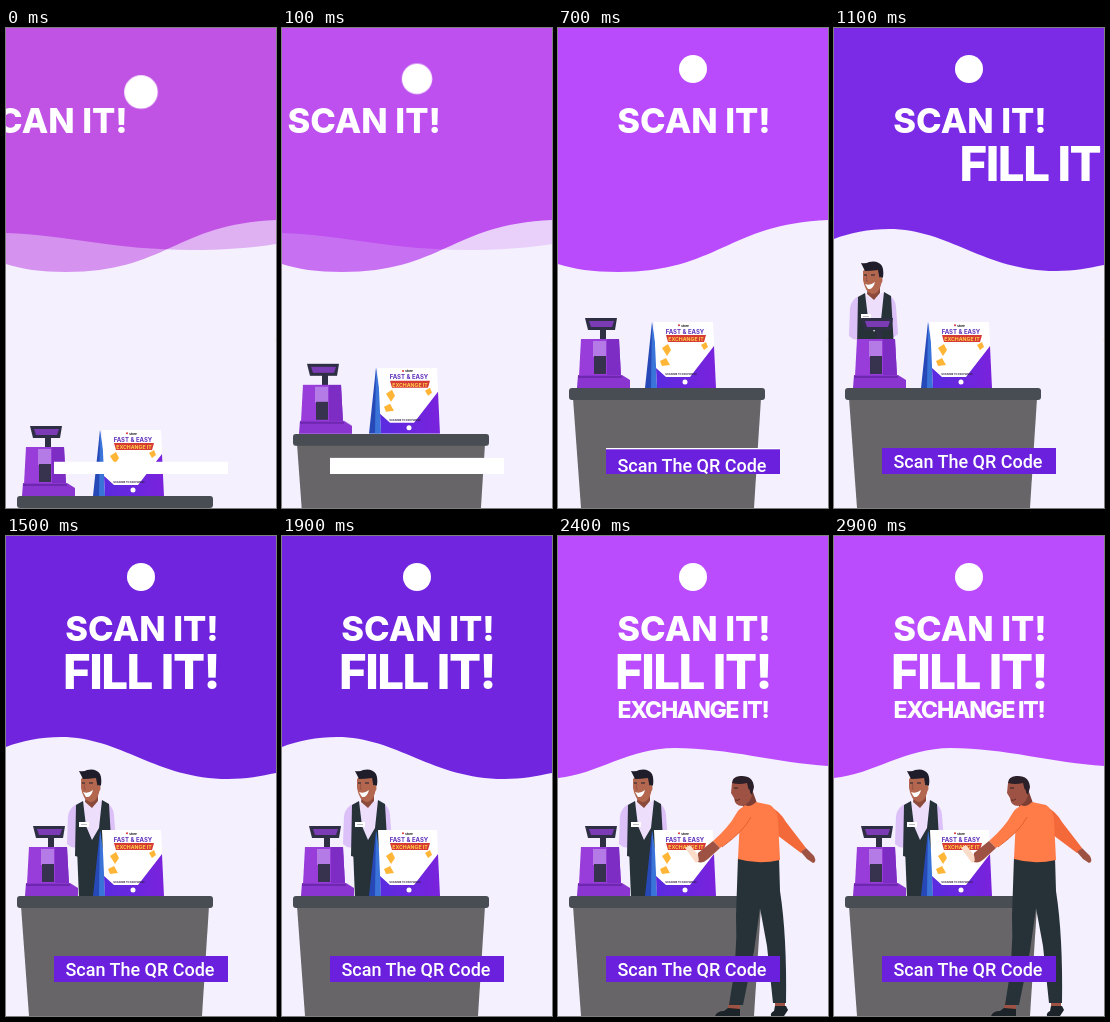
Animation of 270 by 480 pixels, one loop 3 s. Source, as an HTML page:

```html
<!DOCTYPE html>
<html lang="en">
<head>
<meta charset="utf-8">
<title>Scan it, fill it, exchange it</title>
<style>
  html, body { margin: 0; width: 100%; height: 100%; overflow: hidden; background: #f4f0fe; }
  svg { display: block; width: 100vw; height: 100vh; --out: cubic-bezier(.33,1,.68,1); }

  .move, .move * { animation: 3s linear infinite paused; }
  .head { font: 800 34.5px Inter, sans-serif; font-optical-sizing: none; fill: #fff; text-anchor: middle; }
  .label { font: 500 18px Roboto, sans-serif; fill: #fff; text-anchor: middle; }
  .tiny { font: 700 3px Inter, sans-serif; text-anchor: middle; }

  /* Adding the layers keeps the overlap solid while the waves dissolve. */
  #sky { animation-name: tint; fill: currentColor; isolation: isolate; }
  #sky use { mix-blend-mode: plus-lighter; }
  #swell { animation-name: swell; }
  #rising { animation-name: rising; }
  #falling { animation-name: falling; }
  #ebb { animation-name: ebb; }
  #hill { animation-name: hill; }
  #core { animation-name: core; }

  #logo { animation-name: logo; transform-origin: 135px 41px; }
  #scan { animation-name: scan; }
  #fill { animation-name: fill; font-size: 47.5px; letter-spacing: -1.5px; }
  #swap { animation-name: swap; font-size: 23px; letter-spacing: -1.3px; }
  #desk { animation-name: rise; }
  #till { animation-name: nudge; }
  #clerk { animation-name: clerk; }
  #buyer { animation-name: buyer; }
  #plate { animation-name: plate; transform-origin: 0 446px; }
  #bar { animation-name: bar; transform-origin: 0 446px; }
  #cta { animation-name: cta; }

  @keyframes tint {
    0% { color: #c052e4; }
    7%, 26.67% { color: #b94bfc; }
    36.67% { color: #7a2ae6; }
    43%, 63.33% { color: #7024de; }
    70% { color: #b047f6; }
    80%, 100% { color: #ba4cfe; }
  }
  @keyframes swell {
    0% { opacity: .4; }
    6.67%, 100% { opacity: 0; }
  }
  @keyframes rising {
    0% { opacity: .6; }
    6.67%, 26.67% { opacity: 1; }
    36.67%, 100% { opacity: 0; }
  }
  @keyframes falling {
    0%, 26.67% { opacity: 0; }
    36.67%, 63.33% { opacity: 1; }
    70%, 100% { opacity: 0; }
  }
  @keyframes ebb {
    0%, 63.33% { opacity: 0; }
    70% { opacity: .25; }
    76.67%, 100% { opacity: 0; }
  }
  @keyframes hill {
    0%, 63.33% { opacity: 0; }
    70% { opacity: .25; }
    76.67%, 100% { opacity: 1; }
  }
  @keyframes core {
    0%, 63.33% { opacity: 0; }
    70% { opacity: .5; }
    76.67%, 100% { opacity: 0; }
  }
  @keyframes logo {
    0% { transform: translateY(23px) scale(1.2); animation-timing-function: var(--out); }
    10%, 100% { transform: none; }
  }
  @keyframes scan {
    0% { transform: translateX(-91px); animation-timing-function: var(--out); }
    13.33%, 100% { transform: none; }
  }
  @keyframes fill {
    0%, 30% { transform: translateX(216px); animation-timing-function: var(--out); }
    46.67%, 100% { transform: none; }
  }
  @keyframes swap {
    0%, 63.33% { transform: translateX(-216px); animation-timing-function: var(--out); }
    76%, 100% { transform: none; }
  }
  @keyframes rise {
    0% { transform: translateY(108px); animation-timing-function: var(--out); }
    10%, 100% { transform: none; }
  }
  @keyframes nudge {
    0% { transform: translateX(-3px); }
    10%, 100% { transform: none; }
  }
  @keyframes clerk {
    0%, 30% { transform: translateX(-145px); animation-timing-function: var(--out); }
    46.67%, 100% { transform: none; }
  }
  @keyframes buyer {
    0%, 63.33% { transform: translateX(142px); animation-timing-function: var(--out); }
    76.67%, 100% { transform: none; }
  }
  @keyframes plate {
    0% { transform: scaleY(.47); }
    10% { transform: scaleY(.92); }
    16%, 100% { transform: none; }
  }
  @keyframes bar {
    0%, 3.33% { transform: scaleY(0); }
    10% { transform: scaleY(.64); }
    16.67% { transform: scaleY(.87); }
    23.33% { transform: scaleY(.95); }
    30%, 100% { transform: none; }
  }
  @keyframes cta {
    0%, 10% { transform: translateY(28px); animation-timing-function: var(--out); }
    33.33%, 100% { transform: none; }
  }
</style>
</head>
<body>
<svg class="move" viewBox="0 0 270 480" preserveAspectRatio="none">
  <defs>
    <path id="up" d="M0 0H270V192C170 196 160 244 60 244C35 244 15 241 0 236Z"/>
    <path id="down" d="M0 0H270V237C255 240 240 243 222 243C150 243 115 201 55 201C35 201 15 205 0 211Z"/>
    <path id="flat" d="M0 0H270V216C245 220 215 222 185 222C110 222 60 207 0 205Z"/>
    <path id="bump" d="M0 0H270V230C220 227 170 212 117 212C70 212 40 238 0 242Z"/>
    <path id="low" d="M0 0H270V207C190 209 130 226 95 238C60 250 30 255 0 256Z"/>
    <clipPath id="inLow"><use href="#low"/></clipPath>
    <clipPath id="inBar"><rect x="48" y="420" width="174" height="26"/></clipPath>
    <linearGradient id="flag" x1="0" x2="1"><stop stop-color="#5a2be0"/><stop offset="1" stop-color="#7a22dc"/></linearGradient>
  </defs>

  <g id="sky">
    <use id="swell" href="#flat"/>
    <use id="rising" href="#up"/>
    <use id="falling" href="#down"/>
    <use id="ebb" href="#low"/>
    <use id="hill" href="#bump"/>
    <use id="core" href="#bump" clip-path="url(#inLow)"/>
  </g>

  <circle id="logo" cx="135" cy="41" r="14" fill="#fff"/>
  <g class="head">
    <text id="scan" x="136" y="105">SCAN IT!</text>
    <text id="fill" x="135" y="153">FILL IT!</text>
    <text id="swap" x="135" y="182">EXCHANGE IT!</text>
  </g>

  <g id="clerk">
    <path d="M71 312H105V362H73Z" fill="#263238"/>
    <path d="M78 266Q64 268 62 280L61 308Q67 314 73 310L76 285Z" fill="#dcc0f8"/>
    <path d="M94 265Q107 267 108 279L110 306Q104 312 98 308Z" fill="#dcc0f8"/>
    <path d="M75 266L85 270L96 264L99 304H74Z" fill="#eddffc"/>
    <path d="M77 265L70 269L69 320Q88 326 106 320L103 268L96 264L93 292L86 304L80 290Z" fill="#263238"/>
    <path d="M80 256L92 253V265L86 272L79 266Z" fill="#8c4a3c"/>
    <path d="M75 243Q78 239 91 240L94 252Q92 266 84 266Q77 264 75 252Z" fill="#b4674f"/>
    <path d="M77 243L73 235Q78 236 81 234Q90 232 94 238Q96 242 95 249L92 253L90 242Q82 243 77 243Z" fill="#1f1d2a"/>
    <ellipse cx="92.500" cy="252" rx="2" ry="3" fill="#b4674f"/>
    <path d="M77 256Q82 258 87 254Q85 262 80 261Z" fill="#fff"/>
    <path d="M76 247H79M83 247H87" stroke="#1f1d2a"/>
    <path d="M79 248L78 253H80" fill="none" stroke="#8c4a3c" stroke-width=".7"/>
    <rect x="73" y="286" width="10" height="5" fill="#fff"/>
    <path d="M75 288.500H81" stroke="#9a9aa8" stroke-width=".7"/>
  </g>

  <g id="desk">
    <path d="M15 370H203L196 480H23Z" fill="#676568"/>
    <rect x="11" y="360" width="196" height="12" rx="3" fill="#484d53"/>

    <g id="till">
      <path d="M42 300H48V314H42Z" fill="#2e2f45"/>
      <path d="M27 290H59L57 302H30Z" fill="#2e2f45"/>
      <path d="M31 293H56L54 299H33Z" fill="#7a3bb4"/>
      <path d="M23 311H61L63 348H21Z" fill="#983cda"/>
      <path d="M49 311H61L63 348H49Z" fill="#7e2dc4"/>
      <path d="M35 313H48V329H35Z" fill="#b47ae6"/>
      <path d="M36 328H48V346H36Z" fill="#37324e"/>
      <path d="M20 347H64L72 352V360H19Z" fill="#8a35d0"/>
      <path d="M20 349H64" stroke="#6423a4" stroke-width="1.500"/>
    </g>

    <path d="M94 294L99 360H87Z" fill="#2749b8"/>
    <path d="M94 294L98 320L99 360H93Z" fill="#3a74d8"/>
    <path d="M96 294H155L158 360H99Z" fill="#fff"/>
    <path d="M156 318L158 360H99L98 340L108 349H132Z" fill="url(#flag)"/>
    <path d="M104 320L110 316L113 322L109 328ZM143 317L148 314L150 319L146 322ZM102 333L108 330L112 337L104 338Z" fill="#ffb637"/>
    <g class="tiny">
      <circle cx="121" cy="297.300" r="1" fill="#d8333a"/>
      <text x="127" y="298.500">store</text>
      <text x="127" y="305.500" style="font-size:6px" fill="#5a2bb8">FAST &amp; EASY</text>
      <path d="M108 307H148L146 314H110Z" fill="#d63a35"/>
      <text x="128" y="312.800" style="font-size:5.200px" fill="#ffd24a">EXCHANGE IT</text>
      <text x="123" y="347" style="font-size:2.600px" fill="#302545">SCAN ME TO EXCHANGE</text>
    </g>
    <circle cx="127" cy="354" r="2.500" fill="#fff"/>
  </g>

  <g id="buyer">
    <path d="M212 271Q221 274 228 286L248 312L243 317L215 296Z" fill="#f4693a"/>
    <path d="M243 316L248 312L256 320Q259 326 255 327L249 323Z" fill="#9e5243"/>
    <path d="M172 464H182V475H169ZM217 462H227V475H217Z" fill="#9e5243"/>
    <path d="M180 321H221L222 355Q229 400 228 467H215L209 410L202 372L196 415L185 469H171Q180 420 178 380Z" fill="#263238"/>
    <path d="M170 472L182 473V480H157Q159 475 166 475Z" fill="#1c2329"/>
    <path d="M217 470H228L230 474L226 480H213Q212 477 216 475Z" fill="#1c2329"/>
    <path d="M181 261L195 256L200 270L187 275Z" fill="#7d3f35"/>
    <path d="M174 247Q178 240 191 243L195 254Q194 267 184 270Q177 270 176 262L173 257Z" fill="#9e5243"/>
    <path d="M174 247Q174 241 182 240Q195 239 196 251L194 259L191 255L189 247Q181 249 174 247Z" fill="#2b2029"/>
    <ellipse cx="190" cy="256" rx="2" ry="3" fill="#9e5243"/>
    <path d="M176 252H180" stroke="#2b2029"/>
    <path d="M177 264Q180 265 182 263" fill="none" stroke="#5b2b22"/>
    <path d="M187 269Q192 272 198 266L212 269Q219 273 220 284L222 324Q200 329 180 323L182 282Q181 273 187 269Z" fill="#ff7b47"/>
    <path d="M186 271Q194 272 193 282Q185 296 162 312L155 305Q171 291 178 278Q181 272 186 271Z" fill="#ff7b47"/>
    <path d="M193 281Q186 295 164 311" fill="none" stroke="#e2602f"/>
    <path d="M155 305L162 312L150 323Q143 329 139 325L140 317Z" fill="#9e5243"/>
    <path d="M127 312L132 309L143 323L138 327Z" fill="#fbdcc8"/>
    <path d="M140 318L147 322L141 326Z" fill="#9e5243"/>
  </g>

  <rect id="plate" x="48" y="420" width="174" height="26" fill="#fff"/>
  <rect id="bar" x="48" y="420" width="174" height="26" fill="#6a20dc"/>
  <g clip-path="url(#inBar)"><text id="cta" class="label" x="134" y="440">Scan The QR Code</text></g>
</svg>
<script>
  const loop = 3000, step = 100;
  const anims = document.getAnimations();
  const start = performance.now();

  // The whole scene advances ten times a second.
  function draw() {
    const t = Math.floor(((performance.now() - start) % loop) / step) * step;
    for (const a of anims) a.currentTime = t;
    requestAnimationFrame(draw);
  }
  draw();
</script>
</body>
</html>
```
